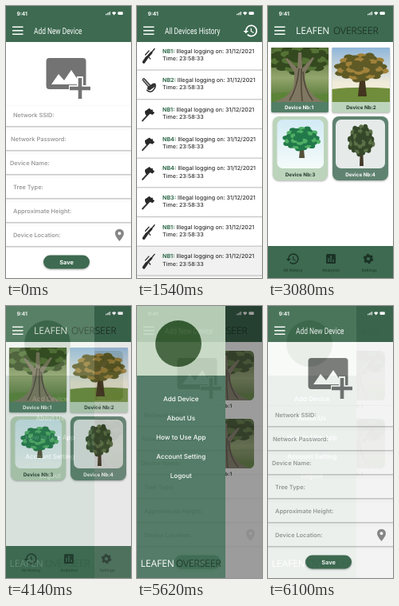
Write an HTML page that moves like this. It is 157 px wide and 340 px high and loops after 6.16 s.

```html
<!DOCTYPE html>
<html lang="en">
<head>
<meta charset="utf-8">
<title>App screens</title>
<style>
  html, body { margin: 0; width: 100%; height: 100%; overflow: hidden; background: #fff; }
  svg.stage { display: block; width: 100vw; height: 100vh; }
  text { font-family: Inter, sans-serif; text-rendering: geometricPrecision; }
  .mid { text-anchor: middle; }
  .title { font: 400 11px Roboto, sans-serif; fill: #fff; }
  .brand { font: 400 12px "Open Sans", sans-serif; fill: #fff; }
  .brand .dark { font-weight: 300; fill: #111a15; }
  .field { font-size: 7.4px; font-weight: 600; fill: #9b9b9b; }
  .log { font-size: 7.1px; font-weight: 500; fill: #303030; }
  .log .id { font-weight: 700; fill: #2f6a4a; }
  .label { font-size: 6.3px; font-weight: 700; text-anchor: middle; fill: #22382c; }
  .label.light { fill: #fff; }
  .nav { font-size: 4.9px; font-weight: 500; text-anchor: middle; fill: #1f3a2b; }
  .menu { font-size: 8.1px; font-weight: 500; text-anchor: middle; fill: #fff; }
  .card { filter: drop-shadow(0 1.3px 1px rgba(0, 0, 0, .33)); }

  /* Each dissolve advances in 60 ms steps. */
  .history { animation: history 6160ms linear infinite; }
  .home { animation: home 6160ms linear infinite; }
  .drawer { animation: drawer 6160ms linear infinite; }
  @keyframes history {
    0% { opacity: 0; }
    16.23% { opacity: 0; animation-timing-function: steps(10, start); }
    25.97% { opacity: 1; }
    60% { opacity: 1; animation-timing-function: step-end; }
    80%, 100% { opacity: 0; }
  }
  @keyframes home {
    0% { opacity: 0; }
    41.23% { opacity: 0; animation-timing-function: steps(10, start); }
    50.97% { opacity: 1; }
    80% { opacity: 1; animation-timing-function: step-end; }
    85%, 100% { opacity: 0; }
  }
  @keyframes drawer {
    0% { opacity: 0; }
    66.23% { opacity: 0; animation-timing-function: steps(10, start); }
    75.97% { opacity: 1; }
    91.23% { opacity: 1; animation-timing-function: steps(9, start); }
    100% { opacity: .1; }
  }
</style>
</head>
<body>
<svg class="stage" viewBox="0 0 157 340" xmlns="http://www.w3.org/2000/svg">
  <defs>
    <linearGradient id="sky" x2="0" y2="1">
      <stop offset="0" stop-color="#8fb6da"/><stop offset=".65" stop-color="#f1ecd9"/>
    </linearGradient>
    <linearGradient id="woods" x2="0" y2="1">
      <stop offset="0" stop-color="#4a6430"/><stop offset=".55" stop-color="#93a56d"/><stop offset="1" stop-color="#4f7431"/>
    </linearGradient>
    <linearGradient id="mist" x2="0" y2="1">
      <stop offset="0" stop-color="#d3ebf5"/><stop offset="1" stop-color="#f5fbfa"/>
    </linearGradient>
    <clipPath id="rounded">
      <rect x="75" y="56" width="72" height="62" rx="6"/>
      <rect x="75" y="141" width="72" height="62" rx="6"/>
    </clipPath>

    <g id="header">
      <rect width="157" height="45" fill="#3d6a50"/>
      <text x="13.4" y="11.5" font-size="6.6" font-weight="700" fill="#fff">9:41</text>
      <path d="M125.6 11.3v-1.4M127.2 11.3V9M128.8 11.3V8M130.4 11.3V7" stroke="#fff"/>
      <path d="M133 8.5q2.7-2.3 5.4 0L135.7 11.5z" fill="#fff"/>
      <rect x="140.5" y="7.3" width="6.3" height="3.8" rx="1" fill="#fff"/>
    </g>
    <path id="burger" d="M8 26.2h13.5M8 30.7h13.5M8 35.2h13.5" stroke="#fff" stroke-width="1.5"/>

    <symbol id="clock" viewBox="0 0 24 24">
      <path d="M13 3a9 9 0 0 0-9 9H1l3.9 3.9L9 12H6a7 7 0 1 1 2 4.9l-1.4 1.4A9 9 0 1 0 13 3zm-1 5v5l4.3 2.5.7-1.2-3.5-2.1V8z"/>
    </symbol>

    <g id="rifle" fill="none" stroke="#2b2b2b" stroke-linecap="round">
      <path d="M-6 7.5l3.5-5" stroke-width="3.6"/>
      <path d="M-3 3L3.5-4" stroke-width="2.8"/>
      <path d="M3-3.5L7.5-9" stroke-width="1.4"/>
      <path d="M0 1l2.2 2.6M-4-1.5l4.5-5" stroke-width="1.3"/>
    </g>
    <g id="saw" fill="none" stroke="#343434" stroke-linecap="round">
      <path d="M-6-7L2 2" stroke-width="4"/>
      <path d="M-6-7L2 2" stroke="#a7a7a7" stroke-width="1.7"/>
      <path d="M1 3.5L6 0" stroke-width="5"/>
      <path d="M-2 6q4 4 8 0t2-8" stroke-width="1.6"/>
    </g>
    <g id="axe">
      <path d="M-7.5 7.5L4.5-5.5" stroke="#393939" stroke-width="2" stroke-linecap="round"/>
      <path d="M-4.5-4.5L1-8.2 7.6-2.5 5 .2 1.5-1.2Q-1 .5-2.2 1.5-5-1-4.5-4.5z" fill="#292929"/>
    </g>

    <symbol id="oldTree" viewBox="0 0 72 68" preserveAspectRatio="none">
      <rect width="72" height="68" fill="url(#woods)"/>
      <path d="M0 58q18-4 34 0t38-1v11H0z" fill="#5b8438"/>
      <g data-crown="36 13 44 22 #34491f #557336"/>
      <path d="M4 68q20-7 24-20 2-9 1-17L18 14l2-1 13 13 1-20h4l1 20 13-14 2 1-11 18q-2 10 2 18 6 13 22 19z" fill="#7f7761"/>
      <path d="M35 26q-2 24-12 40M38 26q-1 22 1 41M40 30q1 22 12 36" fill="none" stroke="#504a39" stroke-width="1.6"/>
    </symbol>
  </defs>

  <g id="add">
    <rect width="157" height="340" fill="#fff"/>
    <use href="#header"/><use href="#burger"/>
    <text class="title" transform="translate(35 34.8) scale(.76 1)">Add New Device</text>
    <rect x="50.5" y="65" width="50" height="39" rx="4" fill="#737373"/>
    <path d="M57 98l9-13 7 8 9-13 12 18z" fill="#fff"/>
    <g fill="none">
      <path d="M93 88v29M79 103h28" stroke="#fff" stroke-width="8"/>
      <path d="M93 90v26M80 103h26" stroke="#737373" stroke-width="4.6"/>
    </g>
    <g id="fields"></g>
    <path d="M142.5 294q-5.5-6.3-5.5-9.8a5.5 5.5 0 0 1 11 0q0 3.5-5.5 9.8zm0-11.8a2 2 0 1 0 .01 0z" fill="#858585" fill-rule="evenodd"/>
    <rect class="card" x="47" y="311.5" width="58" height="17" rx="8.5" fill="#3d6a50"/>
    <text class="mid" x="76" y="322.7" font-size="7.3" font-weight="700" fill="#fff">Save</text>
  </g>

  <g class="history">
    <rect width="157" height="340" fill="#fff"/>
    <g id="logs"></g>
    <use href="#header"/><use href="#burger"/>
    <text class="title" transform="translate(35 34.8) scale(.76 1)">All Devices History</text>
    <use href="#clock" x="132.7" y="21" width="20" height="20" fill="#fff"/>
  </g>

  <g class="home">
    <rect width="157" height="340" fill="#fff"/>
    <use href="#header"/><use href="#burger"/>
    <text class="brand" x="35" y="35.3">LEAFEN <tspan class="dark" x="82">OVERSEER</tspan></text>

    <rect class="card" x="4" y="52" width="72" height="81" rx="2" fill="#527e66"/>
    <use href="#oldTree" x="4" y="52" width="72" height="68"/>
    <text class="label light" x="39" y="128.7">Device Nb:1</text>

    <rect class="card" x="80.5" y="52" width="72.5" height="81" rx="2" fill="#bcd4bb"/>
    <rect x="80.5" y="52" width="72.5" height="68" fill="url(#sky)"/>
    <path d="M80.5 104q30-4 72.5-1v17H80.5z" fill="#6f8d3a"/>
    <path d="M113 113l3-28-16-11 16 7 2-15 2 15 15-8-14 12 3 28z" fill="#43351f"/>
    <g data-crown="117 77 36 19 #5f5a26 #a1823a"/>
    <text class="label" x="117" y="128.7">Device Nb:2</text>

    <rect class="card" x="6" y="138" width="69" height="80" rx="8" fill="#bcd4bb"/>
    <rect x="11.5" y="142" width="58.5" height="61" rx="7" fill="url(#mist)"/>
    <path d="M39 190l1.5-16h4l1.5 16z" fill="#54513a"/>
    <g data-crown="42 166 25 16 #22794a #4fb065"/>
    <text class="label" x="40.5" y="212.7">Device Nb:3</text>

    <rect class="card" x="81" y="138" width="70" height="80" rx="8" fill="#5f8370"/>
    <rect x="85" y="142" width="62" height="61" rx="7" fill="#e6eae9"/>
    <path d="M115 200l1-25h3l1 25z" fill="#443a2a"/>
    <g data-crown="117 168 18 21 #36482a #5b7046"/>
    <text class="label light" x="116" y="212.7">Device Nb:4</text>

    <rect y="300" width="157" height="40" fill="#3d6a50"/>
    <g fill="#1b3226">
      <use href="#clock" x="22" y="307" width="18" height="18"/>
      <rect x="73" y="310" width="12" height="12" rx="1.5"/>
      <path d="M76 320v-5M79 320v-8M82 320v-3" stroke="#3d6a50" stroke-width="1.4"/>
      <g fill="none" stroke="#1b3226">
        <circle cx="126" cy="316" r="3.6" stroke-width="3"/>
        <circle cx="126" cy="316" r="5.4" stroke-width="1.8" stroke-dasharray="2.83"/>
      </g>
    </g>
    <text class="nav" x="31.5" y="331.5">All History</text>
    <text class="nav" x="79" y="331.5">Analytics</text>
    <text class="nav" x="127" y="331.5">Settings</text>
  </g>

  <g class="drawer">
    <rect width="157" height="340" fill="#fff"/>
    <use href="#header"/>
    <text class="brand" x="82" y="35.3"><tspan class="dark">OVERSEER</tspan></text>
    <g clip-path="url(#rounded)">
      <use href="#oldTree" x="75" y="56" width="72" height="62"/>
      <use href="#oldTree" x="75" y="141" width="72" height="62"/>
    </g>
    <text class="label" x="101" y="127">Device Nb:1</text>
    <text class="label" x="101" y="212">Device Nb:1</text>
    <rect width="157" height="340" opacity=".43"/>
    <rect width="111" height="340" fill="#416e57"/>
    <rect width="111" height="87" fill="#c3d7c0"/>
    <circle cx="52" cy="47" r="29" fill="#34592f"/>
    <g id="menu"></g>
    <text class="brand" x="4.5" y="326.3">LEAFEN <tspan class="dark" x="49">OVERSEER</tspan></text>
  </g>
</svg>
<script>
  const fill = (id, items, draw) => {
    document.getElementById(id).innerHTML = items.map(draw).join('');
  };

  const fields = [['Network SSID:', 9], ['Network Password:', 6], ['Device Name:', 5],
    ['Tree Type:', 9], ['Approximate Height:', 9], ['Device Location:', 9]];
  fill('fields', fields, ([name, x], i) => `
    <rect class="card" x="-3" y="${125 + 30 * i}" width="163" height="25" fill="#fff"/>
    <text class="field" x="${x}" y="${138.7 + 30 * i}">${name}</text>`);

  const logs = [[1, 'rifle'], [2, 'saw'], [1, 'axe'], [4, 'axe'],
    [4, 'axe'], [3, 'axe'], [1, 'rifle'], [1, 'rifle']];
  fill('logs', logs, ([id, tool], i) => `
    <g transform="translate(0 ${44 + 36.7 * i})">
      <rect class="card" x="-3" width="163" height="35.5" fill="${i === 7 ? '#f1f1f1' : '#fff'}"/>
      <use href="#${tool}" x="14.5" y="18.5"/>
      <text class="log" x="32" y="14.5"><tspan class="id">NB${id}:</tspan> Illegal logging on: 31/12/2021</text>
      <text class="log" x="32" y="23.8">Time: 23:58:33</text>
    </g>`);

  const menu = ['Add Device', 'About Us', 'How to Use App', 'Account Setting', 'Logout'];
  fill('menu', menu, (name, i) => `<text class="menu" x="55.3" y="${119 + 24 * i}">${name}</text>`);

  // Foliage: blobs spread on a golden-angle spiral.
  for (const g of document.querySelectorAll('[data-crown]')) {
    const [cx, cy, rx, ry, dark, light] = g.dataset.crown.split(' ');
    const n = 44;
    let blobs = '';
    for (let i = n; i > 0; i--) {
      const r = Math.sqrt(i / n) * .84, a = i * 2.4;
      const x = +cx + rx * r * Math.cos(a), y = +cy + ry * r * Math.sin(a);
      blobs += `<ellipse cx="${x}" cy="${y}" rx="${rx * .17}" ry="${ry * .18}" fill="${i % 3 ? dark : light}"/>`;
    }
    g.innerHTML = blobs;
  }
</script>
</body>
</html>
```
